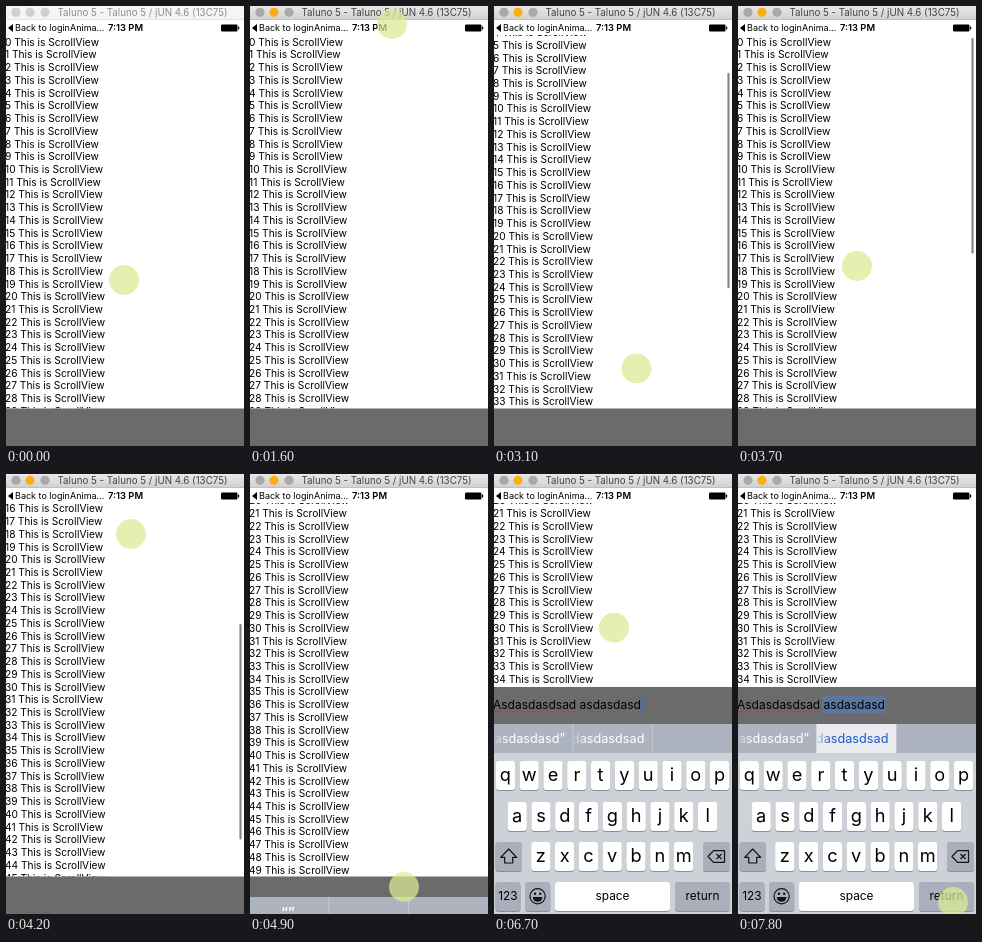
Recreate the animation shown at these times as an HTML page with a canvas. Size 238 by 440 pixels, loop 8000 ms.

```html
<!DOCTYPE html>
<html lang="en">
<head>
<meta charset="utf-8">
<title>Scroll view and keyboard</title>
<style>
html, body { margin: 0; width: 238px; height: 440px; overflow: hidden; background: #fff; }
canvas { display: block; }
</style>
</head>
<body>
<canvas id="stage" width="238" height="440"></canvas>
<script>
const ctx = document.getElementById('stage').getContext('2d');
const LOOP = 8000, STEP = 100;
const LINE = 12.73, LINES = 50, VIEW_TOP = 29, VIEW_BOTTOM = 402.5;
const TYPED = 'Asdasdasdsad asdasdasd';

// [time, x, y] of the pointer
const pointer = [
  [0, 118, 274], [100, 118, 274], [200, 115, 193], [1200, 115, 193],
  [1300, 117, 150], [1400, 121, 67], [1500, 121, 67], [1600, 142, 18],
  [1700, 146, 210], [1800, 148, 384], [2300, 150, 142], [2500, 150, 175],
  [3300, 140, 425], [3400, 133, 380], [3700, 119, 260], [4200, 125, 60],
  [4300, 130, 150], [4600, 154, 413], [5000, 154, 413], [5300, 159, 222],
  [6600, 159, 222], [6900, 42, 17], [7000, 42, 17], [7100, 60, 16], [7800, 215, 428]
];
const scroll = [[1800, 0], [2300, 258], [2500, 242], [3300, 0], [3700, 0], [4200, 205], [4400, 256], [4600, 263.8]];
const keyboardTop = [[4800, 440], [4900, 423], [5000, 350], [5100, 288], [5200, 259], [5300, 251], [5400, 250]];
const barAlpha = [[1800, 0], [1900, 1], [4300, 1], [4600, 0]];

function at(track, t, i = 1) {
  const next = track.findIndex(k => k[0] > t);
  if (next === 0) return track[0][i];
  if (next < 0) return track[track.length - 1][i];
  const a = track[next - 1], b = track[next];
  return a[i] + (b[i] - a[i]) * (t - a[0]) / (b[0] - a[0]);
}

function rect(x, y, w, h, color) {
  ctx.fillStyle = color;
  ctx.fillRect(x, y, w, h);
}

function round(x, y, w, h, r, color) {
  ctx.fillStyle = color;
  ctx.beginPath();
  ctx.roundRect(x, y, w, h, r);
  ctx.fill();
}

function disc(x, y, r, color) {
  ctx.fillStyle = color;
  ctx.beginPath();
  ctx.arc(x, y, r, 0, 7);
  ctx.fill();
}

// y is the middle of the capitals
function text(str, x, y, size, color = '#000', align = 'left', weight = 400) {
  ctx.font = `${weight} ${size}px Inter, sans-serif`;
  ctx.textAlign = align;
  ctx.fillStyle = color;
  ctx.fillText(str, x, y + size * 0.36);
  return ctx.measureText(str).width;
}

function poly(points, x, y) {
  ctx.beginPath();
  points.forEach(([px, py]) => ctx.lineTo(x + px, y + py));
  ctx.closePath();
}

function clipped(x, y, w, h, draw) {
  ctx.save();
  ctx.beginPath();
  ctx.rect(x, y, w, h);
  ctx.clip();
  draw();
  ctx.restore();
}

function drawWindow(active) {
  const g = ctx.createLinearGradient(0, 0, 0, 14);
  g.addColorStop(0, active ? '#e8e8e8' : '#f6f6f6');
  g.addColorStop(1, active ? '#d0d0d0' : '#f4f4f4');
  rect(0, 0, 238, 14, g);
  rect(0, 13.4, 238, 0.6, active ? '#b4b4b4' : '#dadada');
  [10, 24, 39].forEach((x, i) => disc(x, 6.3, 4.6, active ? (i === 1 ? '#fcae17' : '#a9a9a9') : '#cfcfcf'));
  text('Taluno 5 - Taluno 5 / jUN 4.6 (13C75)', 136.5, 6.5, 9.75, active ? '#444' : '#8e8e8e', 'center');
}

function drawStatus() {
  rect(0, 14, 238, 15, '#fff');
  ctx.fillStyle = '#000';
  poly([[0, 0], [5, -4], [5, 4]], 2, 22);
  ctx.fill();
  text('Back to loginAnima…', 9, 22, 9);
  text('7:13 PM', 102, 22, 9.4, '#000', 'left', 600);
  round(215, 18.5, 16.5, 7, 1.2, '#000');
  round(232, 20.5, 1.2, 3, 0.5, '#000');
}

function drawList(t, bottom) {
  const offset = at(scroll, t);
  clipped(0, VIEW_TOP, 238, bottom - VIEW_TOP, () => {
    for (let i = 0; i < LINES; i++) {
      const y = 36 + i * LINE - offset;
      if (y > 15 && y < bottom + 10) text(i + ' This is ScrollView', -1, y, 10.2);
    }
    const alpha = at(barAlpha, t);
    if (alpha) round(233.4, 32 + offset / 263.8 * 152, 2.2, 215.5, 1.1, `rgba(115,115,115,${alpha * 0.85})`);
  });
}

function drawInput(t, top, count, marked) {
  rect(0, top, 238, 440 - top, '#6b6b6b');
  if (!count) return;
  const y = top + 18, split = TYPED.indexOf(' ');
  ctx.font = '400 12px Inter, sans-serif';
  const wordEnd = ctx.measureText(TYPED.slice(0, split)).width - 1;
  const tailStart = ctx.measureText(TYPED.slice(0, split + 1)).width - 1;
  const shown = TYPED.slice(0, count);
  const end = ctx.measureText(shown).width - 1;
  if (marked) rect(tailStart - 1, top + 8.5, end - tailStart + 2, 17.5, '#5c779f');
  text(shown, -1, y, 12);
  if (count > split) {
    ctx.strokeStyle = '#e0352f';
    ctx.lineWidth = 1.3;
    ctx.setLineDash([2, 0.8]);
    ctx.beginPath();
    ctx.moveTo(0, top + 24.3);
    ctx.lineTo(wordEnd, top + 24.3);
    ctx.stroke();
    ctx.setLineDash([]);
  }
  if (!marked && t < 7100) rect(end + 0.6, top + 9.5, 1.4, 16, '#3f6bd8');
}

// Text wider than its cell keeps its end and fades at the left
function cell(index, str, y, color = '255,255,255') {
  const x = index * 79.4, w = 79;
  ctx.font = '400 12.7px Inter, sans-serif';
  if (ctx.measureText(str).width < 69) return text(str, x + w / 2, y, 12.7, `rgb(${color})`, 'center');
  const g = ctx.createLinearGradient(x, 0, x + 13, 0);
  g.addColorStop(0, `rgba(${color},.15)`);
  g.addColorStop(1, `rgb(${color})`);
  clipped(x, y - 14, w, 29, () => text(str, x + 71, y, 12.7, g, 'right'));
}

function drawSuggestions(t, top, count, marked) {
  rect(0, top, 238, 29, '#aeb4bf');
  [78.5, 158].forEach(x => rect(x, top, 0.8, 29, '#c8cdd5'));
  const y = top + 14;
  if (t < 5100) {
    text('“”', 38, y + 1, 13, '#fff', 'center', 700);
  } else if (!count) {
    cell(0, 'I', y);
    cell(1, 'asdasdasdsad', y);
    cell(2, 'The', y);
  } else {
    if (marked) rect(78.5, top, 79.5, 29, '#e9ebef');
    cell(0, `“${TYPED.slice(0, count).split(' ').pop()}”`, y);
    cell(1, 'asdasdasdsad', y, marked ? '24,92,205' : undefined);
  }
}

function key(x, y, w, color, label, size) {
  round(x, y + 1, w, 29, 3.2, '#8b8f96');
  round(x, y, w, 29, 3.2, color);
  if (label) text(label, x + w / 2, y + 14.2, size, '#000', 'center');
}

function drawKeys(top, upper) {
  const gray = '#a9b0bb', white = '#fff';
  rect(0, top + 29, 238, 200, '#cdd1d8');
  [['QWERTYUIOP', 11.4, 37], ['ASDFGHJKL', 23.2, 78], ['ZXCVBNM', 46.8, 118]].forEach(([row, x, y]) => {
    [...row].forEach((c, i) => {
      const left = x + i * 23.8 - 9.6;
      key(left, top + y, 19.2, white, upper ? c : '', 16.8);
      if (!upper) text(c.toLowerCase(), left + 9.6, top + y + 13, 18.2, '#000', 'center');
    });
  });
  ctx.lineWidth = 1.2;
  ctx.strokeStyle = '#111';
  ctx.lineJoin = 'round';

  key(1.5, top + 118, 26.5, upper ? white : gray);
  poly([[0, -7.5], [8, 0.8], [4, 0.8], [4, 6.5], [-4, 6.5], [-4, 0.8], [-8, 0.8]], 14.7, top + 132.5);
  if (upper) { ctx.fillStyle = '#000'; ctx.fill(); }
  else ctx.stroke();

  key(209, top + 118, 27, gray);
  poly([[-8.5, 0], [-3, -5.8], [8, -5.8], [8, 5.8], [-3, 5.8]], 222.5, top + 132.5);
  ctx.stroke();
  ctx.beginPath();
  [-1, 1].forEach(s => {
    ctx.moveTo(222.5, top + 132.5 - 2.5 * s);
    ctx.lineTo(227.5, top + 132.5 + 2.5 * s);
  });
  ctx.stroke();

  const y = top + 158;
  key(1.5, y, 25, gray, '123', 11.9);
  key(31, y, 25.3, gray);
  key(61, y, 115, white, 'space', 11.9);
  key(181, y, 55, gray, 'return', 11.9);
  ctx.beginPath();
  ctx.arc(43.6, y + 14.3, 7.6, 0, 7);
  ctx.stroke();
  disc(41, y + 11.8, 1.2, '#111');
  disc(46.2, y + 11.8, 1.2, '#111');
  ctx.fillStyle = '#111';
  ctx.beginPath();
  ctx.arc(43.6, y + 15, 4.8, 0, Math.PI);
  ctx.fill();
}

function render(t) {
  const top = at(keyboardTop, t);
  const bar = t < 5000 ? VIEW_BOTTOM : Math.min(VIEW_BOTTOM, top - 37);
  const count = t < 5700 ? 0 : Math.min(TYPED.length, Math.ceil((t - 5600) / 100 * 2.2));
  const marked = t >= 7800;
  rect(0, 0, 238, 440, '#fff');
  drawList(t, bar);
  drawWindow(t >= 800);
  drawStatus();
  drawInput(t, bar, count, marked);
  if (top < 440) {
    drawSuggestions(t, top, count, marked);
    drawKeys(top, !count);
  }
  disc(at(pointer, t, 1), at(pointer, t, 2), 15, 'rgba(220,234,147,.73)');
}

const start = performance.now();
function tick() {
  const t = (performance.now() - start) % LOOP;
  render(Math.floor(t / STEP) * STEP);
  requestAnimationFrame(tick);
}
tick();
</script>
</body>
</html>
```
